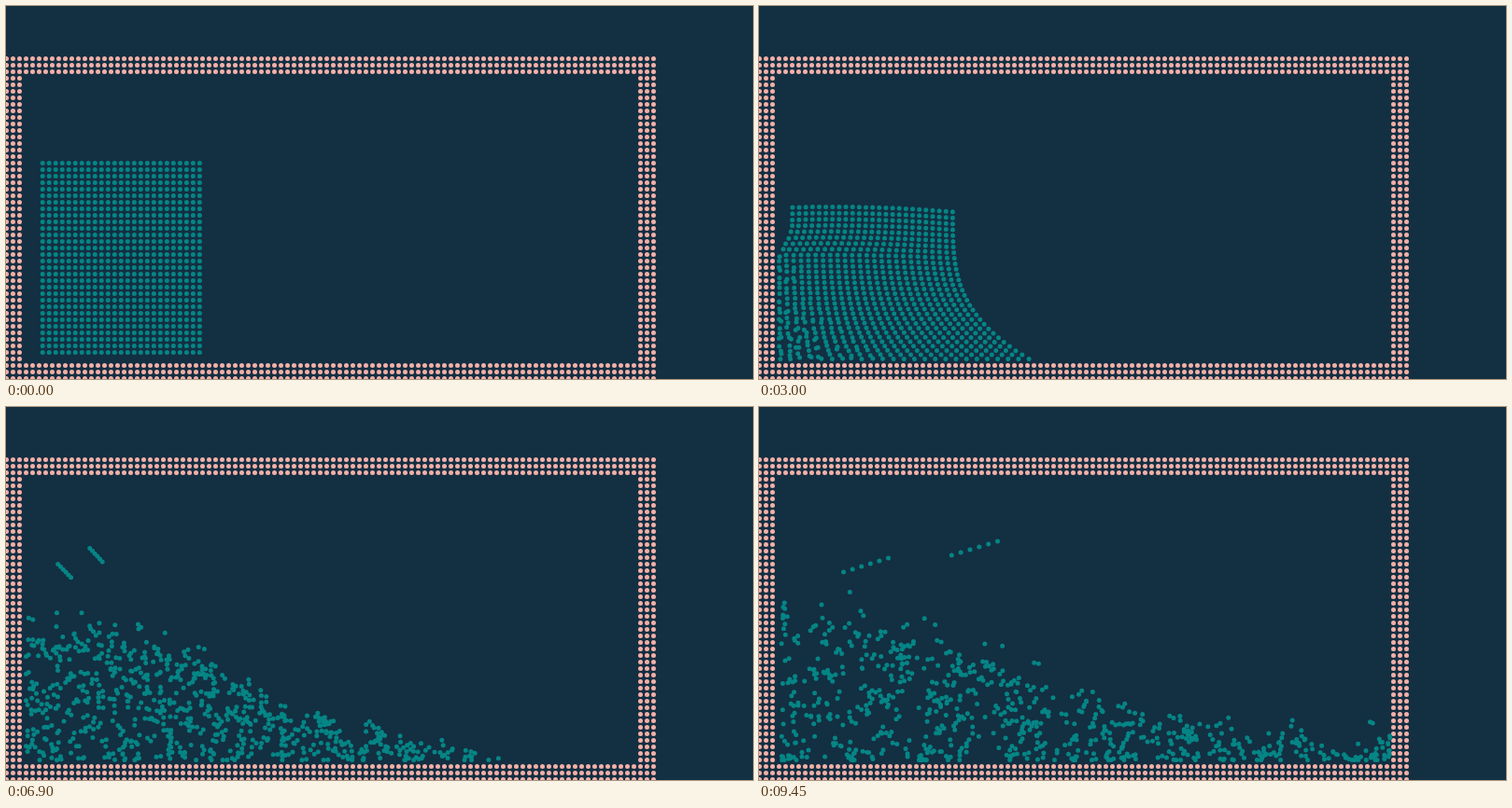
Recreate the animation shown at these times as an HTML page. Size 800x400 px, loop 9.6 s.

```html
<!DOCTYPE html>
<html lang="en">
<head>
<meta charset="utf-8">
<title>Dam break</title>
<style>
  html, body { margin: 0; width: 100%; height: 100%; overflow: hidden; background: #132f42; }
  svg { display: block; width: 800px; height: 400px; }
  path { fill: none; stroke-width: 5; stroke-linecap: round; }
</style>
</head>
<body>
<svg viewBox="0 0 800 400">
  <path id="wall" stroke="#f2b0a8"/>
  <path id="fluid" stroke="#058585"/>
</svg>
<script>
const LOOP = 9600, STEP = 150;
const COLS = 25, ROWS = 30, GAP = 7;
const LEFT = 21.5, RIGHT = 676, FLOOR = 378.5;
const BLOCK = { left: 39.2, right: 207.4, top: 168.5, bottom: 371.5 };
const GRAVITY = 6.35, DROPLETS = 12;

const clamp = (v, lo, hi) => Math.min(hi, Math.max(lo, v));
const mix = (a, b, q) => a + (b - a) * q;
const since = (t, start) => Math.max(0, t - start);
const settle = (t, time, power) => 1 - Math.exp(-((t / time) ** power));
const dot = (x, y) => `M${x.toFixed(2)} ${y.toFixed(2)}h0`;

let seed = 71;
function random() {
  seed = (seed * 16807) % 2147483647;
  return seed / 2147483647;
}
const spread = () => random() * 2 - 1;

// Outline of the collapsing block after t seconds
function shapeAt(t) {
  // Free fall that comes to rest at the given depth
  const fall = depth => BLOCK.top + depth * Math.tanh(GRAVITY * t * t / depth);
  return {
    topLeft: fall(72) - 9 * since(t, 4),
    topMiddle: fall(72),
    topRight: fall(107),
    bottom: Math.min(FLOOR, BLOCK.bottom + GRAVITY * t * t),
    left: mix(BLOCK.left, LEFT, settle(t, 3.9, 6)),
    leftReach: .125 * t ** 5.5,
    shoulder: BLOCK.right + 1.3 * since(t, 3.5) ** 2,
    front: BLOCK.right + 13.2 * t ** 1.66 * settle(t, 1.6, 3),
    flare: 1.6 + 31 * Math.exp(-t / 1.03),
    crowd: .1 * since(t, 1)
  };
}

// Position of the material point u (left to right), v (top to bottom)
function place(shape, u, v) {
  const s = v + shape.crowd * v * (1 - v);
  const curve = s ** shape.flare;
  const top = shape.topLeft * (1 - u) * (1 - 2 * u)
    + shape.topMiddle * 4 * u * (1 - u)
    + shape.topRight * u * (2 * u - 1);
  const left = mix(shape.left, LEFT, Math.min(1, shape.leftReach * curve));
  const right = mix(shape.shoulder, shape.front, curve);
  return [mix(left, right, u), mix(top, shape.bottom, s)];
}

const makeDrift = () => ({
  du: spread(), dv: spread(), toss: spread(), phase: random() * 6.28, rate: .3 + random() * .5
});

const particles = [];
for (let col = 0; col < COLS; col++) {
  for (let row = 0; row < ROWS; row += 2) {
    const paired = random() < .6;
    const shared = makeDrift();
    for (const side of [-1, 1]) {
      particles.push({
        col, row: row + (side + 1) / 2, paired, side,
        drift: paired ? shared : makeDrift()
      });
    }
  }
}

// Particles of the upper left corner fly up the wall, then to the right
function droplet(index, [x, y], t) {
  const speed = 65 * (1 - index / DROPLETS);
  return [
    x + speed * since(t, 5.85),
    mix(y, 144 + 3 * index, settle(since(t, 3), 2.6, 2))
  ];
}

// Scattered version of a particle: wandering, clumped in pairs
function scatter(p, shape, t) {
  const { du, dv, phase, rate } = p.drift;
  const amount = .35 * (t - 1.8);
  const wave = Math.cos(phase + rate * (t - 5));
  const swing = .6 * Math.sin(phase + rate * (t - 5));
  const row = p.paired ? p.row - p.side / 2 : p.row;
  const u = Math.abs(p.col + amount * .6 * (du * wave + dv * swing)) / (COLS - 1);
  const v = Math.abs(row + amount * 1.2 * (dv * wave - du * swing)) / (ROWS - 1);
  const [x, y] = place(shape, u > 1 ? 2 - u : u, Math.min(1, v));
  const reach = p.paired ? 2.4 * p.side : 0, angle = phase * 3 + rate * t;
  return [x + reach * Math.cos(angle), y + reach * Math.sin(angle)];
}

function position(p, shape, t) {
  const u = p.col / (COLS - 1), v = p.row / (ROWS - 1);
  const ordered = place(shape, u, v);
  const index = p.row * DROPLETS / 2 + p.col;
  if (p.row < 2 && p.col < DROPLETS / 2) return droplet(index, ordered, t);

  // Disorder starts at the lower left and travels through the block
  const chaos = clamp((t - 1.8 - 2.6 * u - 1.2 * (1 - v)) / 1.2, 0, 1);
  if (!chaos) return ordered;
  const loose = scatter(p, shape, t);
  let x = mix(ordered[0], loose[0], chaos);
  let y = mix(ordered[1], loose[1], chaos);

  const { du, dv, toss } = p.drift;
  const height = Math.max(0, FLOOR - y);
  y -= 9 * since(t, 4) * toss * Math.abs(toss) * Math.sqrt(height / 200);

  // Splash back from the right wall
  const excess = Math.max(0, x - RIGHT);
  x = Math.min(x, RIGHT) - .6 * excess * Math.abs(du);
  y -= 1.3 * excess * Math.abs(dv);
  return [Math.max(x, LEFT), Math.min(y, FLOOR)];
}

function drawWall() {
  let d = "";
  for (let col = 0; col < 100; col++) {
    for (let row = 0; row < 50; row++) {
      if (col < 3 || col > 96 || row < 3 || row > 46) {
        d += dot(.5 + col * GAP, 56.5 + row * GAP);
      }
    }
  }
  document.getElementById("wall").setAttribute("d", d);
}

const fluid = document.getElementById("fluid");
function draw(ms) {
  const t = ms / 1000, shape = shapeAt(t);
  fluid.setAttribute("d", particles.map(p => dot(...position(p, shape, t))).join(""));
}

const begin = performance.now();
let shown = -1;
function tick() {
  const ms = Math.floor((performance.now() - begin) % LOOP / STEP) * STEP;
  if (ms !== shown) draw(shown = ms);
  requestAnimationFrame(tick);
}
drawWall();
tick();
</script>
</body>
</html>
```
